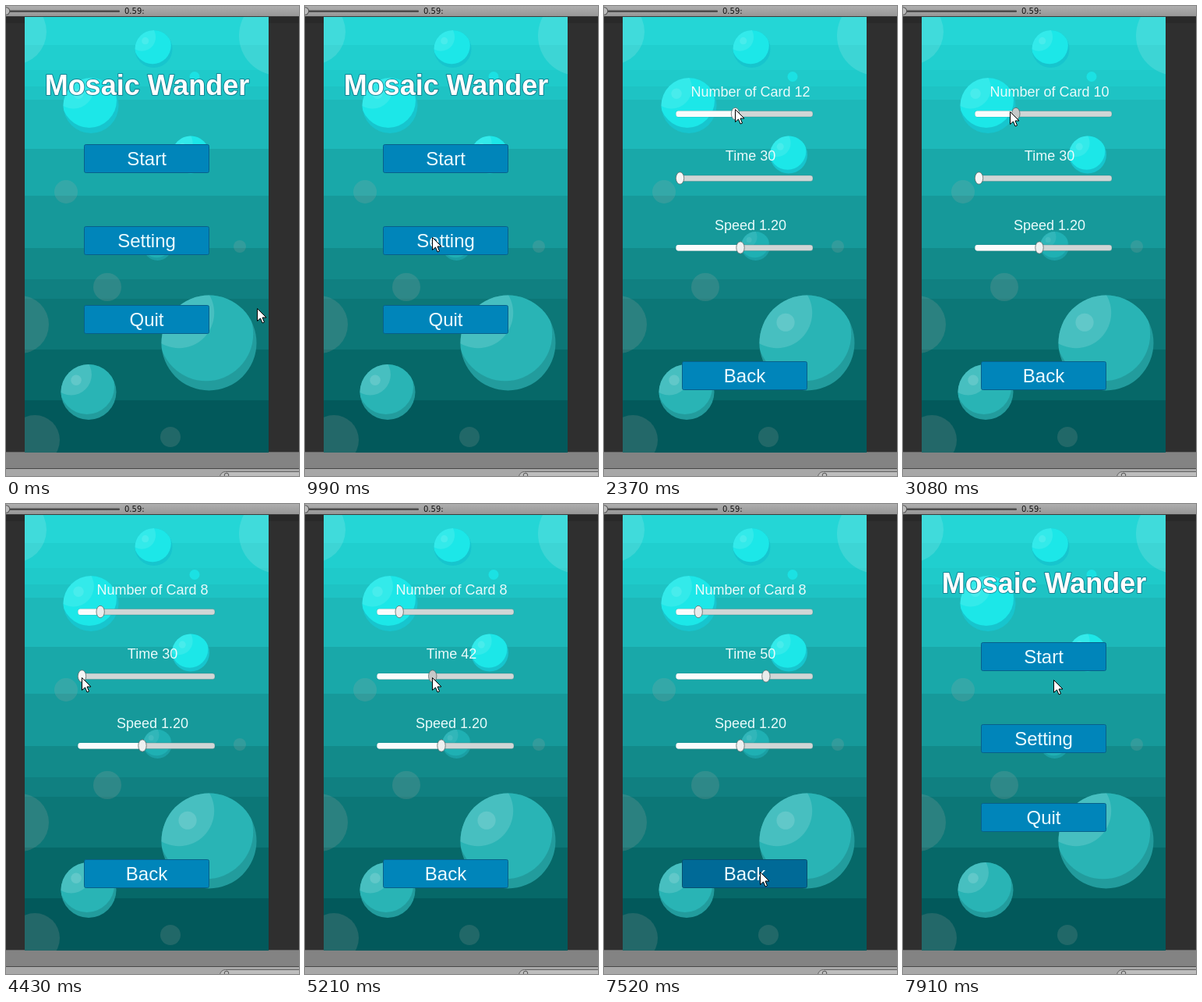
These frames come from a looping animation (376x602 px, 8 s). An HTML page with a canvas:

```html
<!DOCTYPE html>
<html lang="en">
<head>
<meta charset="utf-8">
<title>Menu and settings</title>
<style>
  html, body { margin: 0; width: 100%; height: 100%; overflow: hidden; background: #2f2f2f; }
  canvas { display: block; }
</style>
</head>
<body>
<canvas id="stage" width="376" height="602"></canvas>
<script>
const ctx = document.getElementById('stage').getContext('2d');
const LOOP = 8000;
const SANS = '"Liberation Sans", Arial, sans-serif';

// Each move: start, end, number of discrete steps, evenly timed path points.
const START = [322, 387];
const MOVES = [
  [150, 990, 7, [[163, 296]]],
  [1860, 2370, 5, [[168, 132]]],
  [2650, 3500, 7, [[113, 138]]],
  [3770, 4670, 8, [[108, 186], [101, 234], [97, 222], [130, 222]]],
  [4820, 5660, 7, [[208, 221]]],
  [6120, 7090, 8, [[208, 246], [209, 272], [207, 295], [196, 335],
                   [183, 375], [176, 412], [186, 445], [199, 466]]],
  [7240, 7240, 1, [[200, 471]]],
  [7520, 7910, 4, [[200, 471], [200, 471], [197, 350], [193, 225]]]
];

const clamp = (v, lo, hi) => Math.min(hi, Math.max(lo, v));

function cursorAt(t) {
  let pos = START;
  for (const [start, end, steps, points] of MOVES) {
    if (t < start) break;
    const gap = (end - start) / Math.max(1, steps - 1);
    const done = gap ? Math.min(steps, Math.floor((t - start) / gap + 1e-6) + 1) : steps;
    const path = [pos, ...points];
    const along = done / steps * points.length;
    const i = Math.min(points.length - 1, Math.floor(along));
    pos = path[i].map((v, k) => v + (path[i + 1][k] - v) * (along - i));
  }
  return pos.map(Math.round);
}

function rect(x, y, w, h, fill) {
  ctx.fillStyle = fill;
  ctx.fillRect(x, y, w, h);
}

function disc(x, y, r, fill) {
  ctx.fillStyle = fill;
  ctx.beginPath();
  ctx.arc(x, y, r, 0, Math.PI * 2);
  ctx.fill();
}

function box(x, y, w, h, r, fill, stroke) {
  ctx.beginPath();
  ctx.roundRect(x, y, w, h, r);
  ctx.fillStyle = fill;
  ctx.fill();
  if (stroke) {
    ctx.strokeStyle = stroke;
    ctx.lineWidth = 1;
    ctx.stroke();
  }
}

function text(str, x, y, font, fill, align = 'center') {
  ctx.font = font;
  ctx.textAlign = align;
  ctx.fillStyle = fill;
  ctx.fillText(str, x, y);
}

function bubble(x, y, r, body, shade, glow = 0.14) {
  ctx.save();
  disc(x, y, r, shade);
  ctx.clip();
  disc(x - r * 0.06, y - r * 0.19, r * 0.99, body);
  const light = `rgba(255,255,255,${glow})`;
  disc(x - r * 0.63, y - r * 0.63, r * 0.74, light);
  disc(x - r * 0.45, y - r * 0.43, r * 0.19, light);
  ctx.restore();
}

function backdrop() {
  const bands = [
    [14, '#24d6d6'], [50, '#20cfcf'], [82, '#1fcaca'], [103, '#1ec3c4'],
    [120, '#1db8b9'], [183, '#19a8a9'], [243, '#16999a'], [310, '#128a8a'],
    [350, '#108081'], [375, '#0c7777'], [440, '#066868'], [505, '#02595b']
  ];
  ctx.save();
  ctx.beginPath();
  ctx.rect(24, 14, 313, 558);
  ctx.clip();
  for (const [y, color] of bands) rect(24, y, 313, 572 - y, color);

  disc(10, 33, 42, 'rgba(255,255,255,.13)');
  disc(350, 38, 51, 'rgba(255,255,255,.13)');
  const haze = 'rgba(180,170,165,.18)';
  for (const [x, y, r] of [[77, 238, 15], [300, 308, 8], [130, 360, 18],
                           [18, 408, 37], [37, 556, 32], [211, 552, 13]]) disc(x, y, r, haze);

  bubble(189.5, 55, 24, '#1ce7e8', '#17c5ce', 0.1);
  bubble(109, 127.5, 35.5, '#1ce7e8', '#17c5ce', 0.1);
  bubble(237, 190.5, 24, '#1ce7e8', '#17c5ce', 0.1);
  disc(242, 90.5, 6.5, '#1be1e3');
  bubble(194.5, 307.5, 18.5, '#1fb0b3', '#1a9fa4', 0.08);
  bubble(260.5, 431.5, 61, '#29b4b5', '#229c9d');
  bubble(106, 494.5, 35.5, '#29b4b5', '#229c9d');
  ctx.restore();
}

function editorFrame() {
  rect(0, 0, 376, 602, '#2f2f2f');
  const bar = ctx.createLinearGradient(0, 0, 0, 13);
  bar.addColorStop(0, '#aeaeae');
  bar.addColorStop(1, '#979797');
  rect(0, 0, 376, 13, bar);
  rect(0, 13, 376, 1, '#3c3c3c');
  rect(0, 14, 376, 8, '#292929');
  box(-4, 5.5, 150, 2.5, 1, '#4c4c4c');
  disc(0, 6.5, 5.2, '#555');
  disc(0, 6.5, 4.2, '#bcbcbc');
  text('0.59:', 152, 10, '10px "DejaVu Sans", sans-serif', '#111', 'left');

  rect(0, 571, 376, 22, '#838383');
  rect(0, 571, 376, 1, '#6a6a6a');
  rect(0, 592, 376, 1, '#484848');
  rect(0, 593, 376, 9, '#a8a8a8');
  box(274.5, 596.5, 120, 16, 7, '#bdbdbd', '#606060');
  ctx.beginPath();
  ctx.arc(283, 601, 2.8, 0, Math.PI * 2);
  ctx.strokeStyle = '#555';
  ctx.stroke();
}

function button(label, y, pressed) {
  box(100.5, y + 0.5, 160, 36, 2, pressed ? '#006a97' : '#0085ba', pressed ? '#074f70' : '#08608a');
  text(label, 180.5, y + 27, `24px ${SANS}`, '#ebfbff');
}

function slider(label, textY, y, x, shade) {
  text(label, 188, textY, `18px ${SANS}`, '#e9fbfb');
  box(92.5, y - 3.5, 175.5, 7.5, 3, '#d0d6d6', 'rgba(60,120,120,.35)');
  box(92.5, y - 3.5, x - 92.5, 7.5, [3, 0, 0, 3], '#fafcfc');
  ctx.beginPath();
  ctx.ellipse(x, y, 5.2, 7.7, 0, 0, Math.PI * 2);
  ctx.fillStyle = shade;
  ctx.fill();
  ctx.strokeStyle = 'rgba(80,95,95,.75)';
  ctx.lineWidth = 1;
  ctx.stroke();
}

function menu() {
  ctx.font = `bold 36px ${SANS}`;
  ctx.textAlign = 'center';
  ctx.lineJoin = 'round';
  ctx.strokeStyle = 'rgba(10,95,120,.65)';
  ctx.lineWidth = 2;
  ctx.strokeText('Mosaic Wander', 181, 114);
  ctx.fillStyle = '#fff';
  ctx.fillText('Mosaic Wander', 181, 114);
  button('Start', 177);
  button('Setting', 282);
  button('Quit', 383);
}

function settings(t) {
  const left = 97.5, span = 165.6;
  const pairStep = span / 7, timeStep = span / 30;
  const pairs = Math.round((cursorAt(clamp(t, 2370, 3500))[0] - left) / pairStep);
  const extra = Math.round((cursorAt(clamp(t, 4420, 5900))[0] - left) / timeStep);
  const shade = (from, to) => t >= from && t < to ? '#c6c8c8' : t >= to ? '#e9ecec' : '#f5f6f6';

  slider(`Number of Card ${6 + 2 * pairs}`, 116, 138, left + pairs * pairStep, shade(2650, 3770));
  slider(`Time ${30 + extra}`, 198, 220.5, left + extra * timeStep, shade(4540, 6120));
  slider('Speed 1.20', 287, 309.5, 175, '#eef1f1');
  button('Back', 455, t >= 7520);
}

function pointer([x, y]) {
  const outline = [[0, 0], [0, 16], [4, 12.5], [6.5, 18.5], [9, 17.5], [6.5, 11.5], [11.5, 11.5]];
  ctx.beginPath();
  for (const [dx, dy] of outline) ctx.lineTo(x + 0.5 + dx, y + 0.5 + dy);
  ctx.closePath();
  ctx.fillStyle = '#fff';
  ctx.fill();
  ctx.strokeStyle = '#000';
  ctx.lineWidth = 1;
  ctx.lineJoin = 'miter';
  ctx.stroke();
}

function draw(t) {
  editorFrame();
  backdrop();
  if (t >= 1580 && t < 7660) settings(t);
  else menu();
  pointer(cursorAt(t));
}

const origin = performance.now();
function tick() {
  draw((performance.now() - origin) % LOOP);
  requestAnimationFrame(tick);
}
tick();
</script>
</body>
</html>
```
